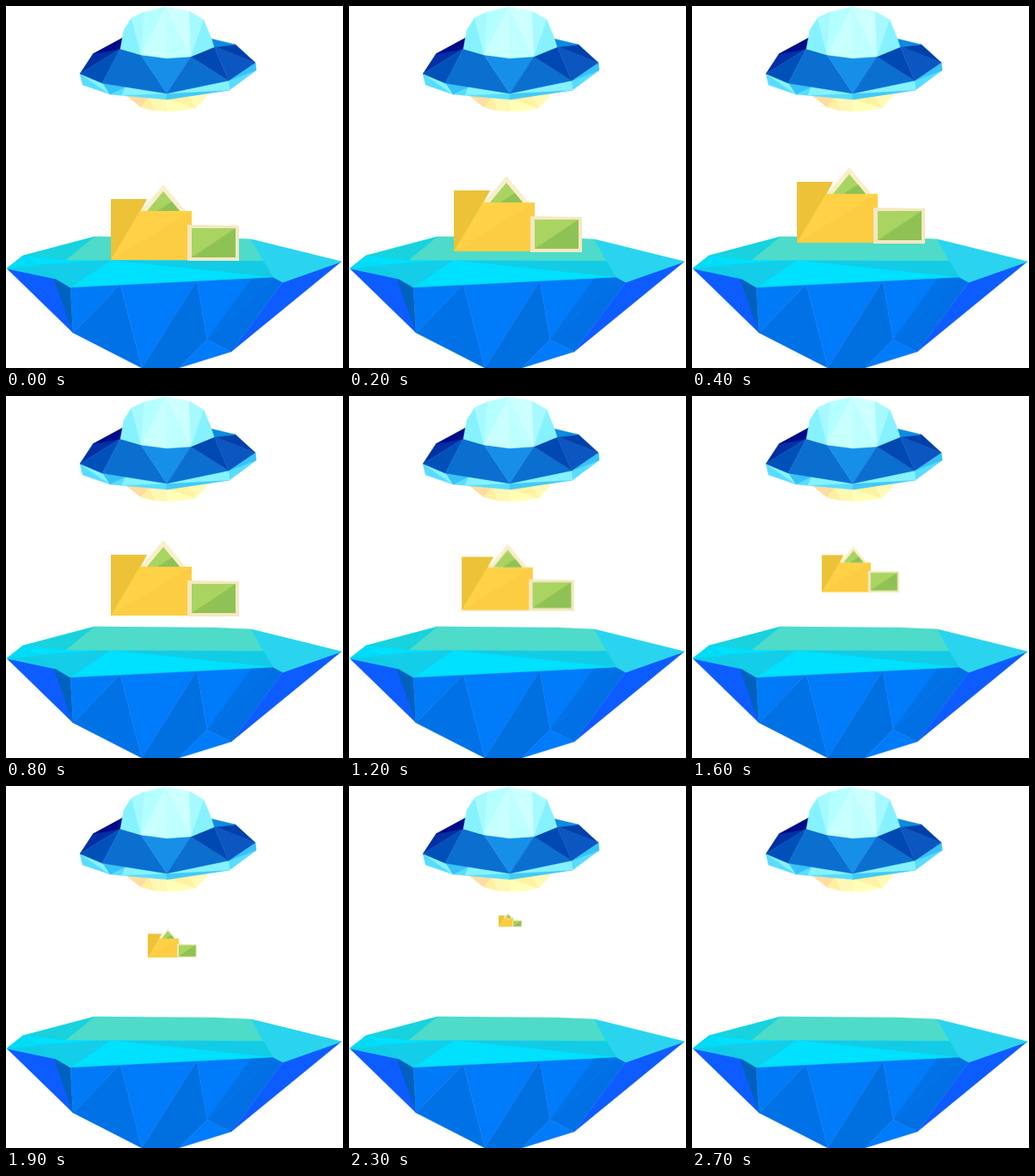
Recreate the animation shown at these times as an HTML page. Size 392 px wide and 422 px high, loop 2.8 s.

```html
<!DOCTYPE html>
<html lang="en">
<head>
<meta charset="utf-8">
<title>Saucer lifting files</title>
<style>
  html, body { margin: 0; width: 100%; height: 100%; overflow: hidden; background: #fff; }
  svg { display: block; width: 392px; height: 422px; }
  .facets polygon { stroke-width: .4; stroke-linejoin: round; }
  #files { transform-origin: 196.5px 252.5px; animation: lift 2800ms infinite; }

  /* Rise in place, shrink, then fly into the saucer; every move is stepped. */
  @keyframes lift {
    0%      { transform: translate(0, 0) scale(1); animation-timing-function: steps(4); }
    28.571% { transform: translate(0, -40px) scale(1); animation-timing-function: step-end; }
    35.714% { transform: translate(0, -40.5px) scale(.946); animation-timing-function: step-end; }
    42.857% { transform: translate(0, -41px) scale(.877); animation-timing-function: steps(2); }
    50%     { transform: translate(-.5px, -42px) scale(.738); animation-timing-function: steps(3); }
    60.714% { transform: translate(-.5px, -54.5px) scale(.537); animation-timing-function: steps(2); }
    67.857% { transform: translate(-3px, -69.5px) scale(.383); animation-timing-function: steps(4); }
    82.142% { transform: translate(-9px, -96.5px) scale(.181); animation-timing-function: steps(4); }
    96.428%, 100% { transform: translate(-9px, -123px) scale(0); animation-timing-function: step-end; }
  }
</style>
</head>
<body>
<svg viewBox="0 0 392 422">
  <g id="island" class="facets">
    <!-- sides -->
    <polygon fill="#0d5cff" points="1,306 58,317 78,381"/>
    <polygon fill="#0062be" points="55,316 75,327 78,381"/>
    <polygon fill="#007af6" points="75,327 133,324 78,381"/>
    <polygon fill="#0072e6" points="133,324 78,381 158,422"/>
    <polygon fill="#007bfa" points="133,324 222,320 158,422"/>
    <polygon fill="#006fe0" points="222,320 234,389 201,422 158,422"/>
    <polygon fill="#007bfa" points="222,320 311,316 234,389"/>
    <polygon fill="#0072e6" points="286,317 311,316 234,389"/>
    <polygon fill="#007cfb" points="234,389 262,403 201,422"/>
    <polygon fill="#0070e4" points="311,316 322,322 262,403 234,389"/>
    <polygon fill="#0d5cff" points="322,322 390,298 262,403"/>
    <!-- top -->
    <polygon fill="#00e0ff" points="1,306 20,291 103,269 285,272 390,298 322,322 311,316 75,328 58,318"/>
    <polygon fill="#12cce6" points="20,291 1,306 58,318 75,328"/>
    <polygon fill="#00dcf5" points="20,291 38,303 1,306"/>
    <polygon fill="#14cde8" points="36,302 122,296 75,328"/>
    <polygon fill="#14cbe6" points="122,296 299,297 311,316"/>
    <polygon fill="#18d2de" points="20,291 103,269 70,296"/>
    <polygon fill="#2ad4ee" points="285,272 390,298 322,322 311,316"/>
    <polygon fill="#4edbc9" points="70,296 103,269 243,270 285,272 299,297"/>
  </g>

  <g id="saucer" class="facets">
    <!-- lamp -->
    <polygon fill="#ffdca2" points="138,103 167,106 157,118"/>
    <polygon fill="#fff0a0" points="167,106 157,118 173,122"/>
    <polygon fill="#fff7b4" points="167,106 187,109 187,123 173,122"/>
    <polygon fill="#ffffb8" points="187,108 187,123 204,122 221,119"/>
    <polygon fill="#fff2a0" points="187,108 221,119 212,104"/>
    <polygon fill="#fffab4" points="212,104 237,101 221,119"/>
    <!-- rim -->
    <polygon fill="#58dcff" points="86,79 112,89 187,101 259,87 290,66 291,75 260,98 187,109 121,103 89,92"/>
    <polygon fill="#86f2ff" points="86,79 112,89 121,103"/>
    <polygon fill="#38c2f8" points="112,89 139,94 121,103"/>
    <polygon fill="#86f2ff" points="139,94 187,102 135,104"/>
    <polygon fill="#44c8fa" points="187,102 187,109 260,98"/>
    <polygon fill="#86f2ff" points="187,102 259,87 260,98"/>
    <polygon fill="#38c2f8" points="259,87 290,66 291,75"/>
    <!-- disc -->
    <polygon fill="#0030a4" points="86,79 101,56 136,37 133,50"/>
    <polygon fill="#000c88" points="101,56 136,37 133,50"/>
    <polygon fill="#0050ba" points="133,50 112,90 86,79"/>
    <polygon fill="#0b6fd0" points="133,50 157,57 187,102 112,90"/>
    <polygon fill="#168fe8" points="157,57 187,60 215,59 187,102"/>
    <polygon fill="#0b6fd0" points="215,59 259,87 187,102"/>
    <polygon fill="#0048b2" points="215,59 242,47 259,87"/>
    <polygon fill="#0c56c2" points="242,47 290,66 259,87"/>
    <polygon fill="#0040aa" points="242,47 267,45 290,66"/>
    <polygon fill="#0c8ce0" points="238,38 267,45 242,48"/>
    <!-- dome -->
    <polygon fill="#86f2ff" points="146,14 161,7 157,57 133,50 137,28"/>
    <polygon fill="#a6faff" points="161,7 146,14 157,57"/>
    <polygon fill="#b4ffff" points="161,7 186,1 157,57"/>
    <polygon fill="#c8ffff" points="186,1 157,57 187,61"/>
    <polygon fill="#beffff" points="186,1 187,61 215,59"/>
    <polygon fill="#ccffff" points="186,1 213,6 215,59"/>
    <polygon fill="#a6faff" points="213,6 230,16 215,59"/>
    <polygon fill="#86f2ff" points="230,16 239,38 242,48 215,59"/>
  </g>

  <g id="files">
    <polygon fill="#ffd147" points="122,225 164,225 157,239 216,239 216,296 122,296"/>
    <polygon fill="#fccd43" points="216,239 216,296 122,296"/>
    <polygon fill="#ecc238" points="122,225 164,225 122,296"/>
    <polygon fill="#faeecb" points="183,208 209,239 157,239"/>
    <polygon fill="#a9d462" points="183,216 202,239 164,239"/>
    <polygon fill="#8fc254" points="193,228 202,239 176,239"/>
    <polygon fill="#f5e8c0" points="211,255 271,256 271,297 211,297"/>
    <polygon fill="#a9d462" points="216,259 267,259 267,293 216,293"/>
    <polygon fill="#8fc254" points="267,259 267,293 216,293"/>
  </g>
</svg>
<script>
  // Each facet is outlined in its own colour to hide seams.
  for (const facet of document.querySelectorAll('.facets polygon')) {
    facet.setAttribute('stroke', facet.getAttribute('fill'));
  }
</script>
</body>
</html>
```
